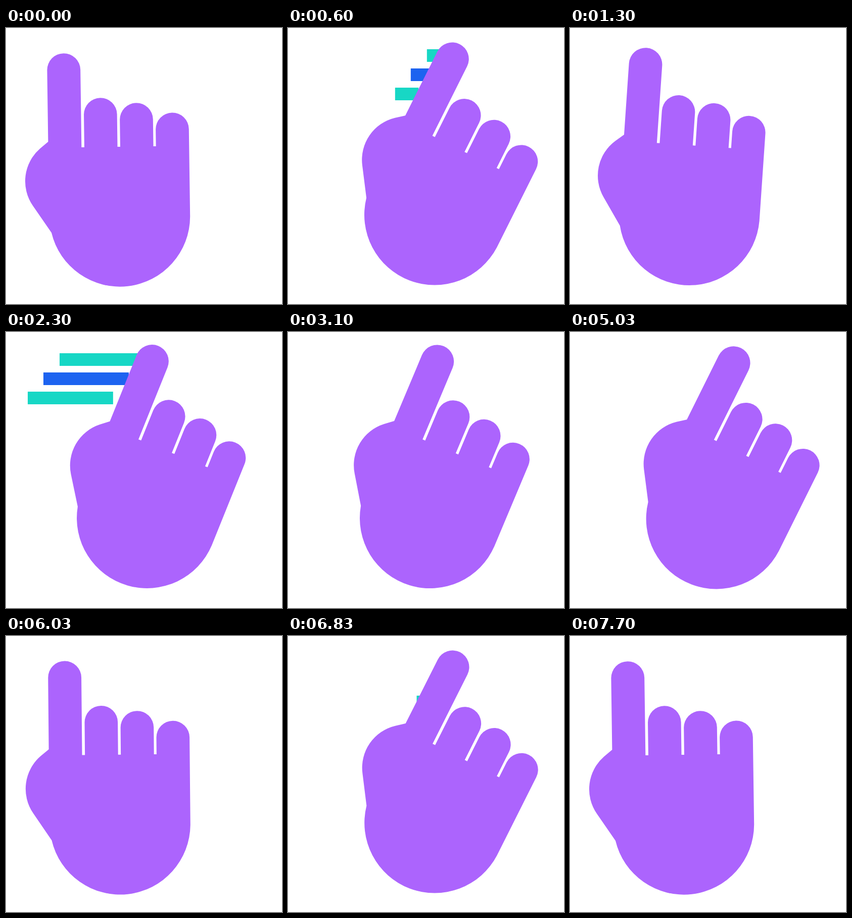
An HTML page for the animation above (8010 ms loop, 546 by 546 pixels).

```html
<!DOCTYPE html>
<html lang="en">
<head>
<meta charset="utf-8">
<title>Swipe</title>
<style>
  html, body { margin: 0; width: 100%; height: 100%; overflow: hidden; background: #fff; }
  svg { display: block; width: 100%; height: 100%; }
</style>
</head>
<body>
<svg viewBox="0 0 546 546">
  <g id="bars">
    <rect x="106" y="42" height="25" fill="#17d7c5"/>
    <rect x="74" y="80" height="25" fill="#1d63f0"/>
    <rect x="43" y="118" height="25" fill="#17d7c5"/>
  </g>
  <path id="hand" fill="#ac64fd" d="M87.3 81a32.9 32.9 0 0 1 65.8 0V234.4H158.7V170
    a32.8 32.8 0 0 1 65.6 0V234.4H229.7V181a32.8 32.8 0 0 1 65.6 0V234.4H300.4V201.2
    a32.8 32.8 0 0 1 65.6 0V374.5A139 139 0 0 1 91.4 402.6L55.2 348.5
    A85.5 85.5 0 0 1 71.1 235.7L87.3 222.5Z"/>
</svg>
<script>
const LOOP = 8010, CYCLE = 2000, SWING = 2000 / 3;
const REST = -0.8, SWEEP = 27.5, REACH = 217;
const hand = document.getElementById('hand');
const bars = [...document.querySelectorAll('#bars rect')].map(el => ({ el, x: +el.getAttribute('x') }));

// cubic-bezier(.33, 0, 0, 1), solved by bisection
function ease(x) {
  if (x <= 0) return 0;
  if (x >= 1) return 1;
  let lo = 0, hi = 1;
  for (let i = 0; i < 24; i++) {
    const s = (lo + hi) / 2;
    if (0.99 * (1 - s) ** 2 * s + s ** 3 < x) lo = s; else hi = s;
  }
  return lo * lo * (3 - 2 * lo);
}

const move = (t, start) => ease((t - start) / SWING);

// two poses per 100 ms: at 0 and at 30
function step(t) {
  const base = Math.floor(t / 100) * 100;
  return t - base < 30 ? base : base + 100 / 3;
}

function draw(now) {
  const t = step(now % LOOP) % CYCLE;
  const angle = REST + SWEEP * (move(t, 0) - move(t, 1000));
  hand.setAttribute('transform', `rotate(${angle} 264 504)`);

  const head = REACH * move(t, 100 / 3), tail = REACH * move(t, 1000 / 3);
  for (const { el, x } of bars) {
    el.setAttribute('x', x + tail);
    el.setAttribute('width', head - tail);
  }
}

const start = performance.now();
function tick() {
  draw(performance.now() - start);
  requestAnimationFrame(tick);
}
tick();
</script>
</body>
</html>
```
